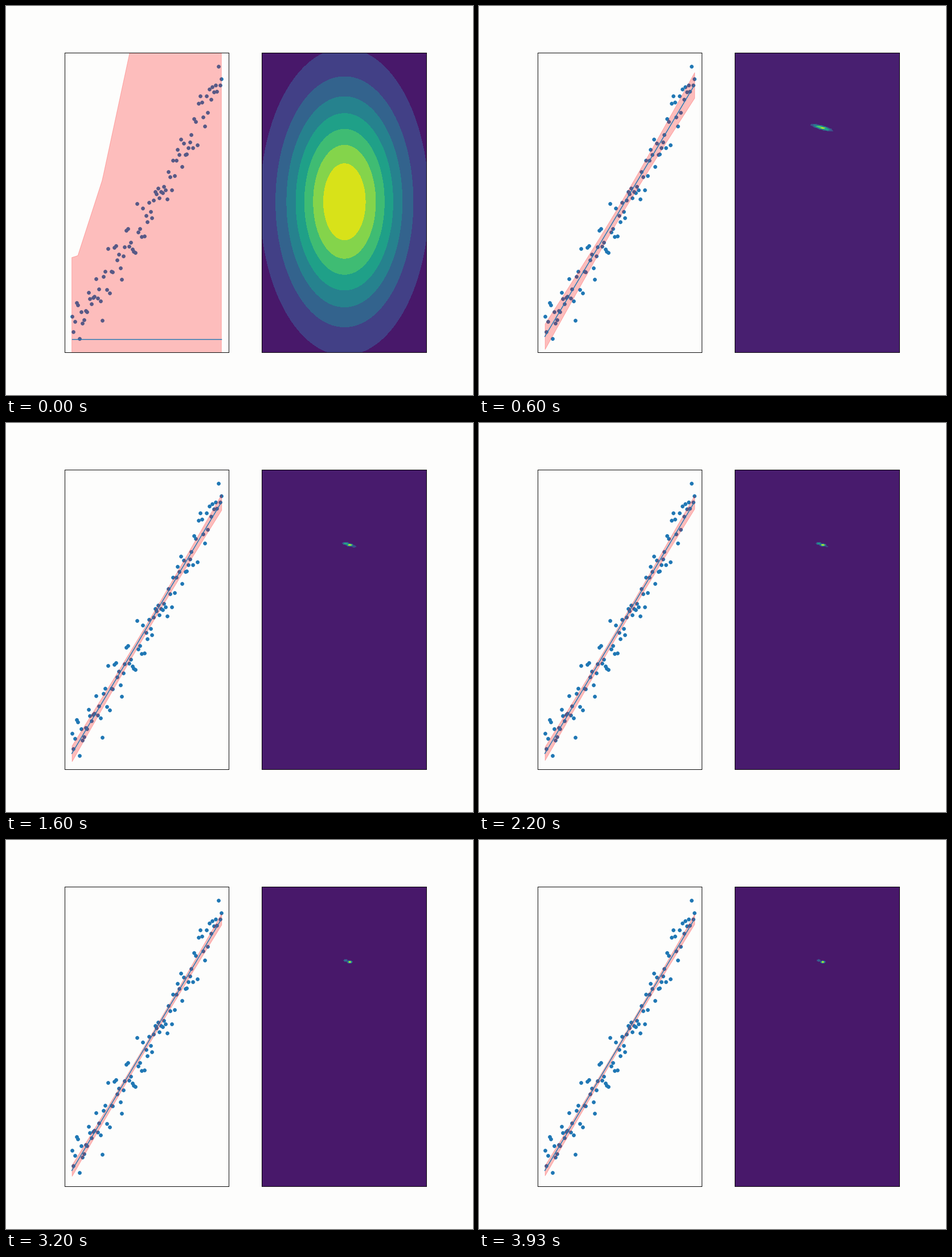
A matplotlib script that plays this animation: 820x683 px, repeating every 3990 ms.

```python
import numpy as np
import matplotlib.pyplot as plt
from matplotlib.animation import FuncAnimation

WIDTH, HEIGHT, DPI = 820, 683, 820 / 12
FRAMES, LOOP_MS = 60, 3990
PAPER = "#fdfdfc"

# Noisy samples of y = x
rng = np.random.RandomState(0)
x = np.linspace(0, 10, 100)
y = x + 0.5 * rng.randn(x.size)
design = np.column_stack([np.ones_like(x), x])

NOISE_VAR = 5.0
BAND = 3.4                                   # half-width in deviations
PRIOR_LINES = np.array([(3.2, 0.18), (2.55, 1.81), (0.7, 2.72)])
INFORMATION = design.T @ design / NOISE_VAR  # gained with each update
EVIDENCE = design.T @ y / NOISE_VAR

grid = np.arange(-2, 2, 0.02)
A, B = np.meshgrid(grid, grid)


def posterior(updates):
    precision = np.eye(2) + updates * INFORMATION
    cov = np.linalg.inv(precision)
    return cov @ (updates * EVIDENCE), cov, precision


def density(mean, precision):
    da, db = A - mean[0], B - mean[1]
    quad = (precision[0, 0] * da**2 + 2 * precision[0, 1] * da * db
            + precision[1, 1] * db**2)
    return np.sqrt(np.linalg.det(precision)) / (2 * np.pi) * np.exp(-quad / 2)


def band(updates, mean, cov):
    if updates == 0:
        reach = (design @ PRIOR_LINES.T).max(axis=1)
    else:
        reach = BAND * np.sqrt(((design @ cov) * design).sum(axis=1))
    centre = design @ mean
    return centre - reach, centre + reach


def padded(values, margin=0.05):
    pad = margin * np.ptp(values)
    return values.min() - pad, values.max() + pad


fig, (left, right) = plt.subplots(
    1, 2, figsize=(WIDTH / DPI, HEIGHT / DPI), dpi=DPI, facecolor=PAPER)
fig.subplots_adjust(left=0.125, right=0.9, bottom=0.1095, top=0.88, wspace=0.2)
for ax in (left, right):
    ax.set_facecolor(PAPER)
    ax.set_xticks([])
    ax.set_yticks([])
    for spine in ax.spines.values():
        spine.set_linewidth(1)

left.scatter(x, y, s=36, color="C0")
line, = left.plot([], [], color="C0", lw=1.5)
left.set_xlim(padded(x))
left.set_ylim(padded(y))
changing = []


def update(frame):
    while changing:
        changing.pop().remove()
    mean, cov, precision = posterior(frame)
    line.set_data(x, design @ mean)
    changing.append(left.fill_between(x, *band(frame, mean, cov),
                                      color="r", alpha=0.25))
    changing.append(right.contourf(A, B, density(mean, precision)))
    right.set_xlim(grid[0], grid[-1])
    right.set_ylim(grid[0], grid[-1])
    return [line]


anim = FuncAnimation(fig, update, frames=FRAMES, init_func=lambda: update(0),
                     interval=LOOP_MS / FRAMES, repeat=True, repeat_delay=0,
                     blit=False)
plt.show()
```
